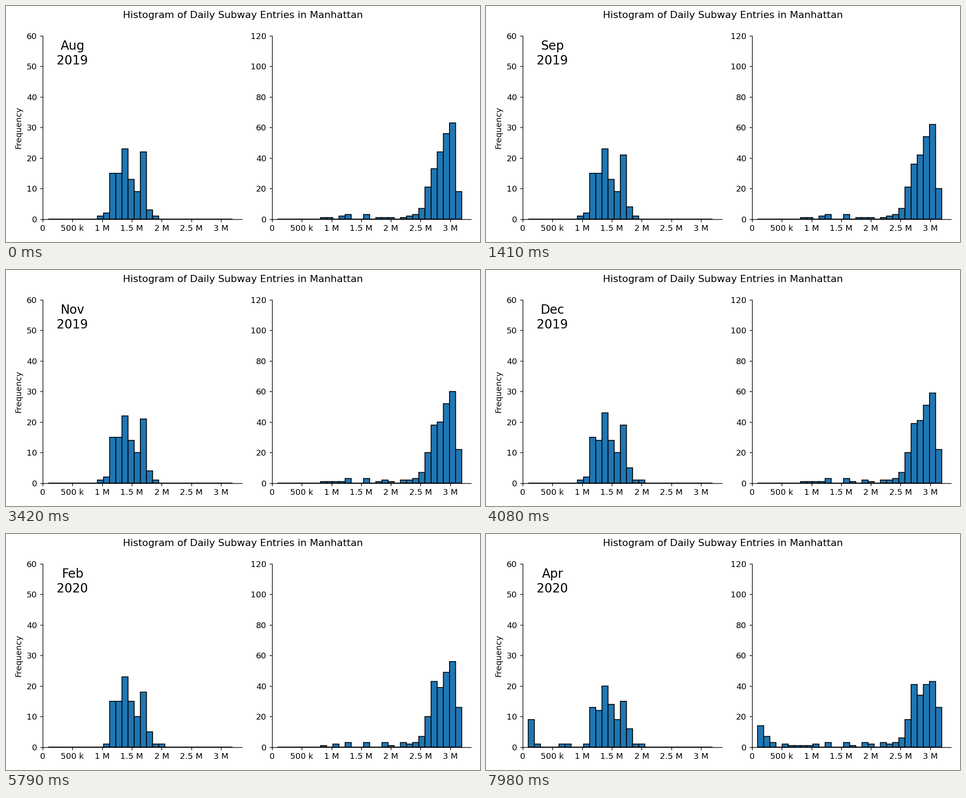
These frames come from a looping animation (1058 px wide and 529 px high, 8000 ms). A matplotlib script:

```python
import numpy as np
import matplotlib.pyplot as plt
from matplotlib.animation import FuncAnimation
from matplotlib.ticker import EngFormatter, MultipleLocator

W, H = 1058, 529
DPI = W / 8
LOOP_MS, STEP_MS, DAY_MS = 8000, 20, 30
DAYS = LOOP_MS // DAY_MS
BINS = 30
FIRST_BIN, LAST_BIN = 0.0925e6, 3.193e6
FIRST_DAY = np.datetime64("2019-08-01")  # a Thursday
CLOSING = 225  # last ordinary day, 13 March
MONTHS = "Jan Feb Mar Apr May Jun Jul Aug Sep Oct Nov Dec".split()

plt.rcParams["font.family"] = "DejaVu Sans"


def shape(first, *counts):
    bins = np.zeros(BINS)
    bins[first:first + len(counts)] = counts
    return bins


# distribution on the first day and on the last ordinary day
WEEKEND = (shape(8, 1, 2, 15, 15, 23, 13, 9, 22, 3, 1),
           shape(9, 1, 15, 14, 23, 15, 10, 18, 6, 1, 1))
WEEKDAY = (shape(7, 1, 1, 0, 2, 3, 0, 0, 3, 0, 1, 1, 1, 0, 1, 2, 3,
                 7, 21, 33, 44, 56, 63, 18),
           shape(7, 1, 0, 2, 0, 3, 0, 0, 3, 1, 0, 3, 2, 0, 3, 2, 3,
                 7, 19, 45, 38, 48, 54, 27))


def is_weekend(day):
    return (day + 3) % 7 >= 5


def closed_bin(day, weekend):
    """Ridership after the closing: a steep fall, then a slow decline."""
    t = day - CLOSING - 3
    level = 6.4 * np.exp(-t / 4) + 1.85 - 0.05 * t
    return max(0, int(0.6 * level - 1 if weekend else level))


def rolling_counts(start, late, weekend, seed):
    """Daily bin counts of a 365-day window: one sample in, one sample out."""
    rng = np.random.default_rng(seed)
    usual, closed, target = start.copy(), np.zeros(BINS), start.copy()
    leaving = start**2 / np.sum(start**2)
    history = [start]

    def surplus():
        noise = 0.2 * np.sqrt(np.maximum(target, 0))
        return usual - target + rng.normal(size=BINS) * noise

    for day in range(1, DAYS + 1):
        joins = is_weekend(day) == weekend
        # the same date a year before falls one weekday earlier
        leaves = is_weekend(day - 1) == weekend
        if day <= CLOSING:
            target = start + (late - start) * day / CLOSING
        elif leaves:
            target = target - leaving
        if joins and day <= CLOSING:
            usual[np.argmin(surplus())] += 1
        elif joins:
            closed[closed_bin(day, weekend)] += 1
        if leaves:
            usual[np.argmax(np.where(usual > 0, surplus(), -np.inf))] -= 1
        history.append(usual + closed)
    return history


def add_panel(left, y_max, y_step):
    ax = fig.add_axes([left / W, 51.4 / H, 444.6 / W, 410.6 / H])
    width = (LAST_BIN - FIRST_BIN) / BINS
    edges = FIRST_BIN + width * np.arange(BINS)
    bars = ax.bar(edges, np.zeros(BINS), width, align="edge", snap=False,
                  color="#1f77b4", edgecolor="black", linewidth=1)
    ax.set(xlim=(0, LAST_BIN * 1.05), ylim=(0, y_max))
    ax.xaxis.set_major_locator(MultipleLocator(500e3))
    ax.xaxis.set_major_formatter(EngFormatter())
    ax.yaxis.set_major_locator(MultipleLocator(y_step))
    ax.spines[["top", "right"]].set_visible(False)
    return ax, bars


fig = plt.figure(figsize=(8, 4), dpi=DPI, facecolor="white")
fig.suptitle("Histogram of Daily Subway Entries in Manhattan", fontsize=12)
left_ax, left_bars = add_panel(82, 60, 10)
right_ax, right_bars = add_panel(593.9, 120, 20)
left_ax.set_ylabel("Frequency", labelpad=4.6)
label = left_ax.text(500e3, 50.7, "", fontsize=15, ha="center")

panels = ((left_bars, rolling_counts(*WEEKEND, True, 4)),
          (right_bars, rolling_counts(*WEEKDAY, False, 7)))


def update(frame):
    day = (frame * STEP_MS + STEP_MS // 2) // DAY_MS
    for bars, history in panels:
        for bar, count in zip(bars, history[day]):
            bar.set_height(count)
    year, month, _ = str(FIRST_DAY + day).split("-")
    label.set_text(f"{MONTHS[int(month) - 1]}\n{year}")
    return [*left_bars, *right_bars, label]


anim = FuncAnimation(fig, update, frames=LOOP_MS // STEP_MS, interval=STEP_MS,
                     repeat=True, repeat_delay=0)
plt.show()
```
